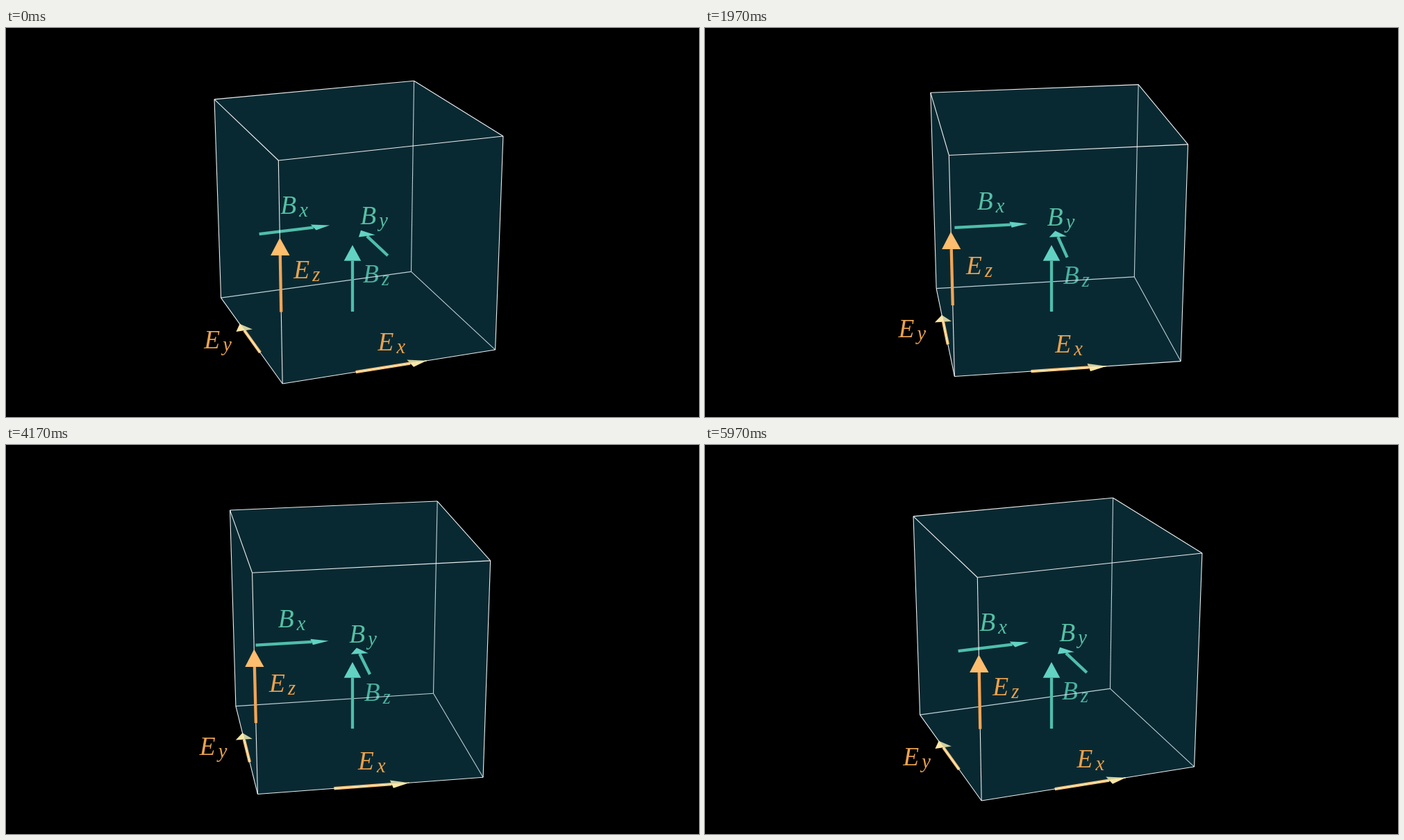
Write an HTML page with a canvas that moves like this. It is 998 by 561 pixels and loops after 6010 ms.

```html
<!DOCTYPE html>
<html lang="en">
<head>
<meta charset="utf-8">
<title>Field components on a cubic cell</title>
<style>
  html, body { margin: 0; width: 100%; height: 100%; overflow: hidden; background: #000; }
  canvas { display: block; width: 998px; height: 561px; }
</style>
</head>
<body>
<canvas id="stage" width="998" height="561"></canvas>
<script>
const ctx = document.getElementById('stage').getContext('2d');
const LOOP = 6010, FRAMES = 180, STEP = 0.1 / 30;
const UNIT = 105.19, FOCUS = 20, CX = 499, CY = 280.5;
const TILT = 70 * Math.PI / 180, START = 20 * Math.PI / 180;
const HALF = 1.5, TIP = 0.235, TIP_HALF = 0.118;
const FACE = 'rgba(28,117,138,0.2)';
const TEAL = '#5cd0b3', TEAL_TIP = '#74ead0';
const ORANGE = '#f0a556', GOLD = '#ffbd6e', SAND = '#f2bd78', PALE = '#fce6a4';
const SERIF = '"Liberation Serif", "Noto Serif", serif';

let yaw = START;

// World axes: x right, y toward the viewer, z up.
function project([x, y, z]) {
  const c = Math.cos(yaw), s = Math.sin(yaw);
  const r = x * c + y * s, f = y * c - x * s;
  const up = z * Math.sin(TILT) - f * Math.cos(TILT);
  const near = f * Math.sin(TILT) + z * Math.cos(TILT);
  const k = UNIT * FOCUS / (FOCUS - near);
  return [CX + r * k, CY - up * k];
}

const add = (p, d, n) => p.map((v, i) => v + d[i] * n);

function trace(points) {
  ctx.beginPath();
  points.map(project).forEach(([x, y]) => ctx.lineTo(x, y));
}

function fill(points, color) {
  trace(points);
  ctx.fillStyle = color;
  ctx.fill();
}

function line(points, color, width) {
  trace(points);
  ctx.strokeStyle = color;
  ctx.lineWidth = width;
  ctx.stroke();
}

// Corners 0-3 are the bottom (back left, front left, front right, back right), 4-7 the top.
const corners = [-HALF, HALF].flatMap(z =>
  [[-1, -1], [-1, 1], [1, 1], [1, -1]].map(([x, y]) => [x * HALF, y * HALF, z]));
const faces = [[0, 3, 2, 1], [4, 5, 6, 7], [0, 1, 5, 4], [1, 2, 6, 5], [2, 3, 7, 6], [3, 0, 4, 7]];
const backEdges = [[3, 0], [3, 2], [3, 7]];
const frontEdges = [[0, 1], [1, 2], [4, 5], [5, 6], [6, 7], [7, 4], [0, 4], [1, 5], [2, 6]];

function facesViewer(points) {
  const p = points.map(project);
  const area = p.reduce((sum, [x, y], i) => {
    const [nx, ny] = p[(i + 1) % p.length];
    return sum + x * ny - nx * y;
  }, 0);
  return area < 0;
}

function drawFaces(front) {
  for (const face of faces) {
    const points = face.map(i => corners[i]);
    if (facesViewer(points) === front) fill(points, FACE);
  }
}

function drawEdges(edges, color) {
  for (const e of edges) line(e.map(i => corners[i]), color, 1.1);
}

const X = [1, 0, 0], Y = [0, -1, 0], Z = [0, 0, 1];
const B_POS = -0.83;
const arrows = {
  Bx: { mid: [B_POS, 0, 0], dir: X, label: [0, 0, 0.33], color: TEAL, tip: TEAL_TIP },
  By: { mid: [0, -B_POS, 0], dir: Y, label: [0, 0, 0.34], color: TEAL, tip: TEAL_TIP },
  Bz: { mid: [0, 0, B_POS], dir: Z, label: [0.36, 0, 0], color: TEAL, tip: TEAL_TIP },
  Ex: { mid: [0, HALF, -HALF], dir: X, label: [0, 0, 0.33], color: SAND, tip: PALE },
  Ey: { mid: [-HALF, 0, -HALF], dir: Y, label: [-0.45, 0, 0], color: SAND, tip: PALE },
  Ez: { mid: [-HALF, HALF, 0], dir: Z, label: [0.355, 0, 0], color: ORANGE, tip: GOLD }
};

function shaft({ mid, dir, color }) {
  line([add(mid, dir, -0.5), add(mid, dir, 0.5 - TIP)], color, 4.3);
}

function head({ mid, dir, tip }) {
  // Upright heads keep facing the viewer; the others lie flat.
  const side = dir === Z ? [Math.cos(yaw), Math.sin(yaw), 0] : dir === X ? [0, 1, 0] : X;
  const base = add(mid, dir, 0.5 - TIP);
  fill([add(mid, dir, 0.5), add(base, side, TIP_HALF), add(base, side, -TIP_HALF)], tip);
}

function arrow(a) {
  shaft(a);
  head(a);
}

function label(name) {
  const { mid, label: offset } = arrows[name];
  const [x, y] = project(add(mid, offset, 1));
  const [main, sub] = name;
  const base = y + (sub === 'y' ? 8.5 : 10);
  ctx.fillStyle = main === 'B' ? '#55c0a4' : '#eaa24e';
  ctx.font = 'italic 37.5px ' + SERIF;
  ctx.fillText(main, x - 20, base);
  ctx.font = 'italic 28.5px ' + SERIF;
  ctx.fillText(sub, x + 7, base + 4);
}

function draw(ms) {
  const tick = Math.floor(ms / 10) * 10;
  const n = Math.min(FRAMES - 1, Math.floor((tick + 4) * 0.03));
  yaw = START - STEP * Math.min(n, FRAMES - 1 - n);
  const { Bx, By, Bz, Ex, Ey, Ez } = arrows;

  ctx.fillStyle = '#000';
  ctx.fillRect(0, 0, 998, 561);
  drawFaces(false);
  label('Bz');
  drawEdges(backEdges, 'rgba(255,255,255,0.9)');
  [By, Bx, Bz].forEach(arrow);
  [Ex, Ey].forEach(head);
  drawFaces(true);
  [Ex, Ey].forEach(shaft);
  drawEdges(frontEdges, 'rgba(255,255,255,0.92)');
  [Ex, Ey].forEach(a => line([add(a.mid, a.dir, -0.5), add(a.mid, a.dir, 0.5)], PALE, 1.2));
  arrow(Ez);
  ['Bx', 'By', 'Ex', 'Ey', 'Ez'].forEach(label);
}

const begin = performance.now();
function loop() {
  draw((performance.now() - begin) % LOOP);
  requestAnimationFrame(loop);
}
loop();
</script>
</body>
</html>
```
